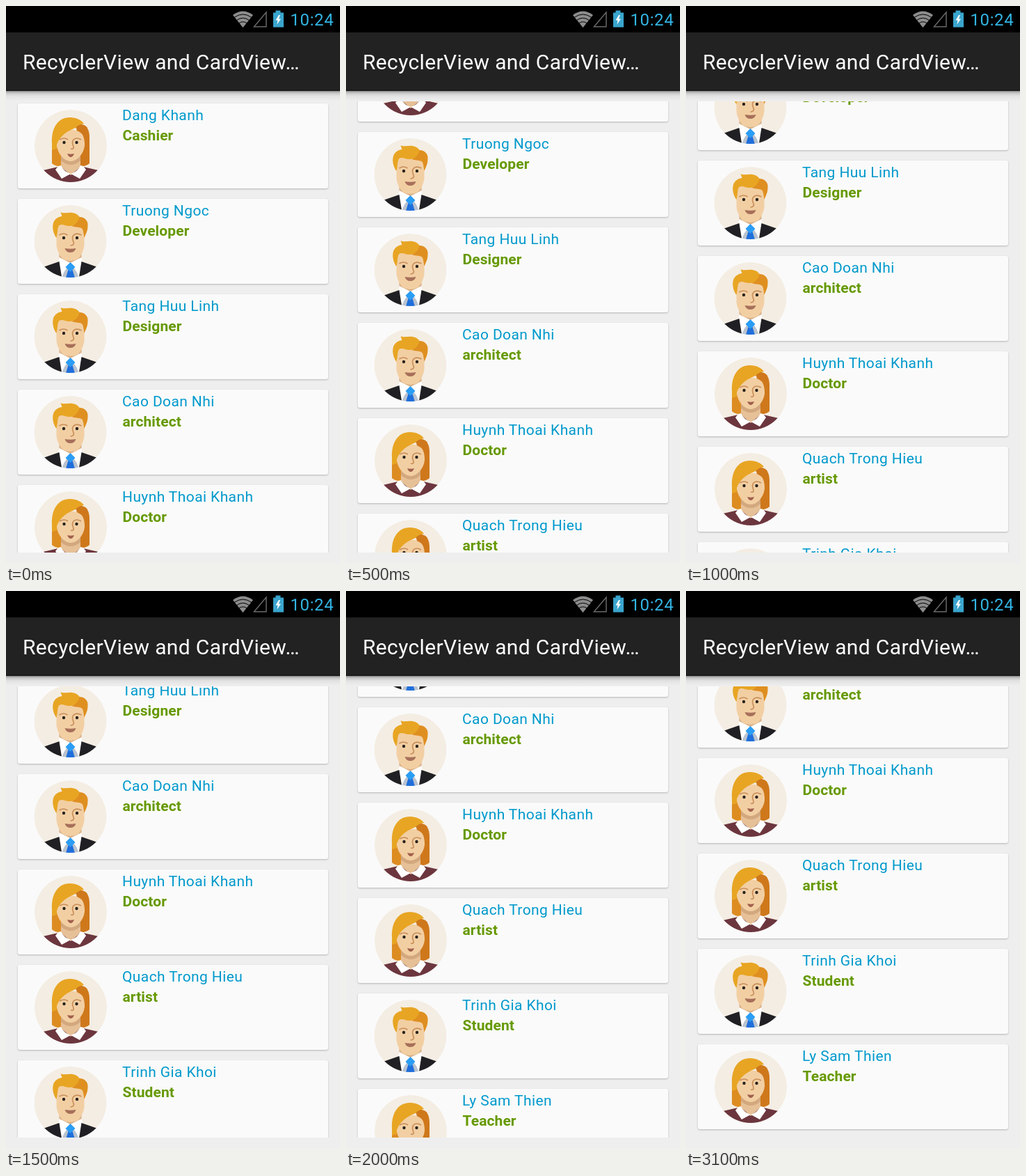
An HTML page that plays this animation: 480x800 px, repeating every 3.5 s.

```html
<!DOCTYPE html>
<html lang="en">
<head>
<meta charset="utf-8">
<title>Card list</title>
<style>
  html, body { margin: 0; width: 100%; height: 100%; overflow: hidden; background: #eee; }
  svg { display: block; width: 480px; height: 800px; font-family: Roboto, "Noto Sans", sans-serif; }
  .clock { font-size: 24px; letter-spacing: .6px; fill: #33b5e5; }
  .title { font-size: 30px; letter-spacing: .36px; fill: #fff; }
  .name { font-size: 21px; letter-spacing: .4px; fill: #0099cc; }
  .job { font-size: 21px; letter-spacing: .1px; font-weight: 700; fill: #669900; }
  .card { fill: #fafafa; filter: drop-shadow(0 1px 1px rgba(0, 0, 0, .24)); }
</style>
</head>
<body>
<svg viewBox="0 0 480 800">
  <defs>
    <linearGradient id="shade" x2="0" y2="1">
      <stop offset="0" stop-color="#000" stop-opacity=".42"/>
      <stop offset=".2" stop-color="#000" stop-opacity=".17"/>
      <stop offset=".5" stop-color="#000" stop-opacity=".05"/>
      <stop offset="1" stop-color="#000" stop-opacity="0"/>
    </linearGradient>
    <clipPath id="view"><rect y="137" width="480" height="648"/></clipPath>
    <clipPath id="disc"><circle r="52"/></clipPath>

    <!-- Avatars are centred on 0,0 -->
    <g id="man" clip-path="url(#disc)">
      <circle r="52" fill="#f4ede3"/>
      <path d="M-16 16H16V28L0 35L-16 28Z" fill="#d9b087"/>
      <path d="M-16 28L0 35L16 28L14 54H-14Z" fill="#b9c3d0"/>
      <path d="M-16 23L0 31L-9 44L-13 54L-17 29Z" fill="#fff"/>
      <path d="M16 23L0 31L9 44L13 54L17 29Z" fill="#fff"/>
      <path d="M-42 38L-16 29L-12 54H-52Z" fill="#202024"/>
      <path d="M42 38L16 29L12 54H52Z" fill="#202024"/>
      <path d="M-3 41H3L7 54H-7Z" fill="#1f6fdb"/>
      <path d="M0 30L7 37L0 44L-7 37Z" fill="#2a9df4"/>
      <path d="M-20 -28H20V4C20 11 16 20 11 25Q6 28 0 28Q-6 28 -11 25C-16 20 -20 11 -20 4Z" fill="#f2cfa3"/>
      <path d="M-20 -5C-24 -10 -26 -18 -25 -24C-24 -31 -19 -35 -12 -36L-14 -42C-9 -39 -3 -42 3 -41C9 -40 12 -37 14 -34C12 -27 7 -22 -1 -22C-8 -22 -12 -26 -16 -23C-19 -20 -18 -12 -20 -5Z" fill="#e8a523"/>
      <path d="M13 -35C21 -35 26 -29 25 -22C25 -15 22 -10 20 -5C19 -10 19 -17 16 -19C12 -21 6 -20 2 -22C8 -24 12 -29 13 -35Z" fill="#df8f20"/>
      <path d="M-16 -9Q-10 -13 -4 -9M16 -9Q8 -13 4 -8C1 -4 5 0 5 3Q4 6 0 6" fill="none" stroke="#c98f5b" stroke-width="1.7"/>
      <circle cx="-9.5" cy="-5" r="2.2" fill="#29231f"/>
      <circle cx="9.5" cy="-5" r="2.2" fill="#29231f"/>
      <path d="M-8 10Q0 11.500 8 10Q6 16 0 16Q-6 16 -8 10Z" fill="#a7705a"/>
    </g>

    <g id="woman" clip-path="url(#disc)">
      <circle r="52" fill="#f4ede3"/>
      <path d="M-27 -12H-12V29Q-22 30 -27 25Z" fill="#dd8c21"/>
      <path d="M8 -31C22 -33 27 -25 27 -12V25Q22 30 12 29Z" fill="#cf781b"/>
      <path d="M-40 35L-18 30H18L40 35L52 54H-52Z" fill="#6c363e"/>
      <path d="M-14 8H14V30L0 42L-14 30Z" fill="#e6c097"/>
      <path d="M-14 10H14V21Q0 33 -14 21Z" fill="#d3a87f"/>
      <path d="M-18 29L-14 28Q-10 37 0 40L-13 47L-22 34Z" fill="#fff"/>
      <path d="M18 29L14 28Q10 37 0 40L13 47L22 34Z" fill="#fff"/>
      <path d="M-20 -10C-16 -28 16 -28 20 -10V0C18 13 8 22 0 22C-8 22 -18 13 -20 0Z" fill="#f2cfa3"/>
      <path d="M-27 -4C-28 -25 -19 -41 -1 -41C8 -41 16 -37 19 -32C13 -31 10 -29 7 -26C0 -23 -14 -18 -20 -2V4L-27 6Z" fill="#e8a523"/>
      <path d="M7 -26C12 -32 20 -32 24 -26L24 10L19 8C21 -2 20 -12 16 -18Q12 -23 7 -26Z" fill="#cf781b"/>
      <path d="M-16 -9Q-9 -13 -4 -9M15 -9Q8 -13 4 -9C0 -4 5 0 4 3Q3 5 0 4" fill="none" stroke="#c98f5b" stroke-width="1.7"/>
      <circle cx="-9.5" cy="-5" r="2.2" fill="#29231f"/>
      <circle cx="8.5" cy="-5" r="2.2" fill="#29231f"/>
      <path d="M-5 11Q0 12.500 5 11Q3 16 0 16Q-3 16 -5 11Z" fill="#a05f4d"/>
    </g>
  </defs>

  <rect width="480" height="800" fill="#eee"/>
  <rect y="122" width="480" height="14" fill="url(#shade)"/>
  <g clip-path="url(#view)"><g id="list"></g></g>

  <rect width="480" height="38"/>
  <rect y="38" width="480" height="84" fill="#222"/>
  <rect y="120.5" width="480" height="1.5" fill="#191919"/>
  <text class="title" x="24" y="91">RecyclerView and CardView…</text>

  <path d="M326 13Q340.500 2 355 13L340.500 31Z" fill="#8c8c8c"/>
  <path d="M328 16.500Q340.500 7.500 353 16.500M331.500 20.500Q340.500 14 349.500 20.500M335 24.500Q340.500 21 346 24.500" fill="none" stroke="#000" stroke-width="1"/>
  <path d="M356.500 29.800L374 9V29.800Z" fill="none" stroke="#686868" stroke-width="1.500"/>
  <path d="M387.500 6.500H394.500V9.500H399V30.500H384V9.500H387.500Z" fill="#3aa5cd"/>
  <path d="M392 13L387.500 20.500H390.500L389.500 26.500L395 18.500H392L394 13Z" fill="#fff"/>
  <text class="clock" x="408.500" y="28">10:24</text>
</svg>
<script>
  const people = [
    ["Dang Khanh", "Cashier", "woman"],
    ["Truong Ngoc", "Developer", "man"],
    ["Tang Huu Linh", "Designer", "man"],
    ["Cao Doan Nhi", "architect", "man"],
    ["Huynh Thoai Khanh", "Doctor", "woman"],
    ["Quach Trong Hieu", "artist", "woman"],
    ["Trinh Gia Khoi", "Student", "man"],
    ["Ly Sam Thien", "Teacher", "woman"]
  ];
  const pitch = 137, top0 = 140;
  const list = document.getElementById("list");

  list.innerHTML = people.map(([name, job, face], i) => `
    <g transform="translate(0 ${top0 + i * pitch})">
      <rect class="card" x="17" width="446" height="122" rx="3"/>
      <use href="#${face}" x="${face === "man" ? 92.5 : 93}" y="61"/>
      <text class="name" x="167" y="24">${name}</text>
      <text class="job" x="167.500" y="53">${job}</text>
    </g>`).join("");

  // [start in ms, scroll in px]; each position holds until the next
  const loop = 3500;
  const stops = [[0, 0], [500, 96], [1000, 192], [1500, 288], [2000, 384], [2500, 448], [loop, 448]];
  list.animate(
    stops.map(([at, y]) => ({
      offset: at / loop,
      transform: `translateY(${-y}px)`,
      easing: "steps(1, end)"
    })),
    { duration: loop, iterations: Infinity }
  );
</script>
</body>
</html>
```
